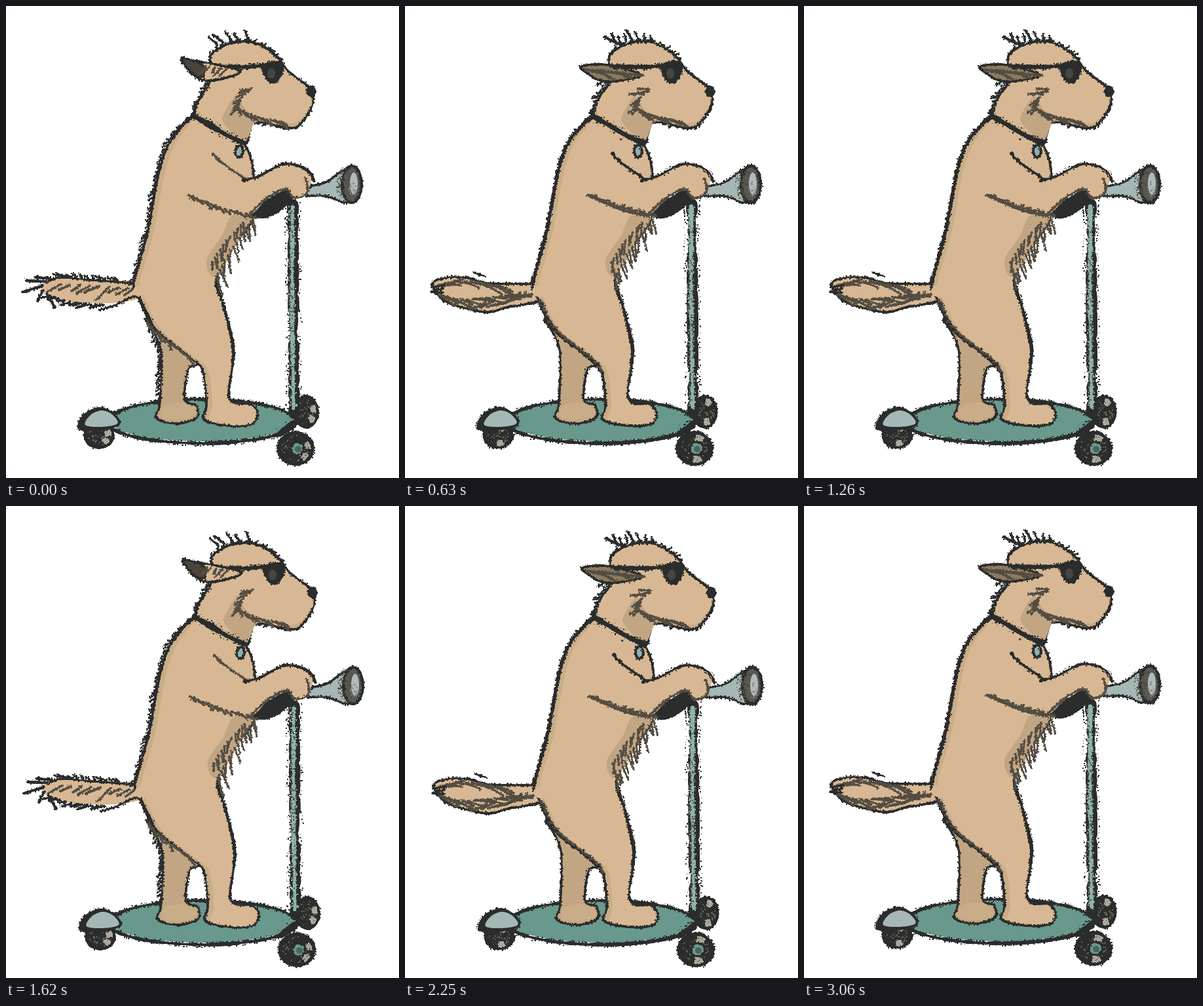
Write an HTML page with a canvas that moves like this. It is 600x720 px and loops after 3.15 s.

```html
<!DOCTYPE html>
<html lang="en">
<head>
<meta charset="utf-8">
<title>Dog on a scooter</title>
<style>
html, body { margin: 0; width: 100%; height: 100%; overflow: hidden; background: #fff; }
canvas { display: block; width: 600px; height: 720px; }
</style>
</head>
<body>
<canvas id="stage" width="600" height="720"></canvas>
<script>
const W = 600, H = 720, STEP = 90, FRAMES = 35;
const INK = '#2b2d2c', SOOT = '#544d42', TAN = '#d8b894', SHADE = '#c9ac88', DIM = '#c2a583',
      TEAL = '#69998c', MIST = '#8fb3aa', STEEL = '#a5b8b5';

function makeRandom(seed) {
  return () => {
    seed = (seed + 0x6D2B79F5) | 0;
    let t = Math.imul(seed ^ seed >>> 15, 1 | seed);
    t = t + Math.imul(t ^ t >>> 7, 61 | t) ^ t;
    return ((t ^ t >>> 14) >>> 0) / 4294967296;
  };
}

// Catmull-Rom through flat [x, y, ...] points, sampled about every 1.5 px
function curve(p, closed) {
  const n = p.length / 2, out = [];
  const at = i => {
    i = closed ? (i + n) % n : Math.max(0, Math.min(n - 1, i));
    return [p[2 * i], p[2 * i + 1]];
  };
  for (let i = 0; i < (closed ? n : n - 1); i++) {
    const [a, b, c, d] = [at(i - 1), at(i), at(i + 1), at(i + 2)];
    const k = Math.max(2, Math.ceil(Math.hypot(c[0] - b[0], c[1] - b[1]) / 1.5));
    for (let j = 0; j < k; j++) {
      const t = j / k;
      out.push([0, 1].map(m => 0.5 * (2 * b[m] + (c[m] - a[m]) * t
        + (2 * a[m] - 5 * b[m] + 4 * c[m] - d[m]) * t * t
        + (3 * b[m] - a[m] - 3 * c[m] + d[m]) * t * t * t)));
    }
  }
  out.push(closed ? out[0] : at(n - 1));
  return out;
}

// Points of an arc on an ellipse
function arc(x, y, rx, ry, from = 0, to = Math.PI * 11 / 6) {
  const p = [];
  for (let k = 0; k < 12; k++) {
    const a = from + (to - from) * k / 11;
    p.push(x + Math.cos(a) * rx, y + Math.sin(a) * ry);
  }
  return p;
}

function sketch(smooth) {
  const canvas = document.createElement('canvas');
  canvas.width = W; canvas.height = H;
  const g = canvas.getContext('2d');
  const rnd = makeRandom(smooth ? 77 : 31);
  const spread = s => (rnd() - 0.5) * 2 * s;
  const pick = (shaggy, sleek) => smooth ? sleek : shaggy;
  const dot = (x, y) => {
    const s = rnd() < 0.5 ? 1 : 2;
    g.fillRect(Math.round(x - 1), Math.round(y - 1), s, s);
  };
  g.lineCap = g.lineJoin = 'round';

  // Charcoal line: uneven core with crumbs along both sides
  function chalk(p, w = 5, color = INK, closed = false) {
    let press = 0.9, last = null;
    g.strokeStyle = g.fillStyle = color;
    for (const q of curve(p, closed)) {
      press = Math.max(0.6, Math.min(1.1, press + spread(0.2)));
      g.lineWidth = w * press * 0.75;
      g.beginPath();
      g.moveTo(...(last || q));
      g.lineTo(...q);
      g.stroke();
      for (let k = 0; k < 2; k++) dot(q[0] + spread(w * 0.6), q[1] + spread(w * 0.6));
      last = q;
    }
  }

  // Short hairs along a curve, leaning by an angle from its direction
  function fur(p, len, lean, gap = 6, w = 3, color = SOOT, closed = false) {
    const pts = curve(p, closed), hop = Math.max(1, Math.round(gap / 1.5));
    for (let i = 0; i < pts.length - 1; i += hop) {
      const [x, y] = pts[i], q = pts[i + 1];
      const a = Math.atan2(q[1] - y, q[0] - x) + lean + spread(0.25), l = len * (0.6 + rnd() * 0.6);
      chalk([x, y, x + Math.cos(a) * l, y + Math.sin(a) * l], w, color);
    }
  }

  // Filled outline; the fill may be shifted to leave a shaded edge
  function shape(p, color, w = 0, shift = null, shade = SHADE) {
    const path = new Path2D();
    curve(p, true).forEach(q => path.lineTo(...q));
    g.fillStyle = shift ? shade : color;
    g.fill(path);
    if (shift) {
      g.save();
      g.clip(path);
      g.translate(...shift);
      g.fillStyle = color;
      g.fill(path);
      g.restore();
    }
    if (w) chalk(p, w, INK, true);
  }
  const oval = (x, y, rx, ry, color, w = 0) => shape(arc(x, y, rx, ry), color, w);

  function specks(x, y, rx, ry, n, color) {
    g.fillStyle = color;
    while (n--) {
      const a = rnd() * 7, r = Math.sqrt(rnd());
      dot(x + Math.cos(a) * rx * r, y + Math.sin(a) * ry * r);
    }
  }

  function wheel(x, y, rx, ry) {
    oval(x, y, rx, ry, INK, 4);
    specks(x, y, rx * 0.8, ry * 0.8, 70, '#60655f');
    for (let r = 0.5; r < 0.9; r += 0.15) {
      for (const a of [pick(-0.5, -1.4), pick(0.5, 1.1)])
        chalk(arc(x, y, rx * r, ry * r, a, a + 0.5), 2, '#aba89b');
    }
  }

  function scooter() {
    wheel(458, 619, 18, 24);
    oval(299, 633, 141, 31, TEAL);
    chalk(arc(299, 634, 143, 34, 3.5, 6), 6);
    chalk(arc(299, 633, 146, 34, 0.25, 2.8), 7);

    wheel(142, 655, 22, 19);
    shape([112, 644, 118, 625, 142, 613, 164, 622, 172, 638, 142, 646], INK, 4);
    shape([121, 639, 129, 624, 146, 617, 162, 623, 170, 637, 145, 642], STEEL);

    chalk([438, 302, 440, 622], 21);
    chalk([437, 306, 437, 460, 439, 612], 8, MIST);
    specks(436, 460, 5, 150, 170, SOOT);
    chalk([418, 653, 433, 641, 448, 632], 12);

    wheel(442, 675, 27, 25);
    oval(445, 675, 10, 10, TEAL, 3);
    oval(446, 676, 5, 5, '#4b655d');
  }

  function horn() {
    shape([376, 314, 400, 296, 428, 282, 437, 292, 415, 314, 390, 323], INK, 3);
    shape([458, 277, 488, 269, 521, 250, 523, 298, 488, 290, 458, 289], STEEL, 4);
    oval(528, 272, 15, 28, '#565a53', 5);
    specks(518, 273, 14, 24, 150, SOOT);
    oval(531, 271, 6, 17, '#b1bbba');
    specks(530, 280, 6, 12, 30, '#8b8880');
  }

  function tail() {
    if (smooth) {
      const top = [42, 424, 60, 415, 90, 414, 130, 423, 204, 426];
      const under = [207, 448, 155, 460, 125, 467, 85, 459, 55, 446];
      shape([...top, ...under], TAN, 4);
      fur([48, 428, 90, 420, 145, 428], 30, 0.15, 9, 4);
      fur([52, 440, 90, 448, 165, 440], 28, 0.3, 9, 4);
      fur([100, 462, 145, 455, 180, 443], 24, -0.15, 9, 4);
      fur([105, 407, 118, 412], 14, 0, 8, 3, INK);
      fur([60, 426, 55, 442], 18, 1.2, 6, 4, INK);
    } else {
      shape([206, 422, 130, 418, 85, 414, 58, 421, 54, 434, 75, 448, 115, 452, 165, 453, 207, 444], TAN);
      chalk([204, 423, 130, 418, 85, 414, 64, 420], 4);
      chalk([207, 441, 190, 445, 165, 457, 142, 464], 4);
      fur([170, 418, 80, 412], 9, 0.5, 8, 3, INK);
      fur([195, 431, 130, 427, 75, 424], 24, -0.6, 14, 4);
      fur([150, 456, 100, 452, 66, 442], 14, -0.35, 8, 4, INK);
      fur([68, 416, 57, 424, 56, 436, 66, 440], 27, 0.85, 9, 5, INK);
    }
  }

  function legs() {
    const far = [216, 478, 230, 506, 237, 535, 235, 605, 230, 629, 262, 637, 291, 628, 290, 609, 273, 600,
                 278, 555, 290, 540];
    shape(far, DIM, 4);
    shape([242, 610, 268, 605, 288, 614, 286, 627, 255, 632, 236, 626], SHADE);
    if (!smooth) fur([220, 485, 236, 530, 234, 575, 235, 602], 8, 0.7, 6, 3, INK);
  }

  function body() {
    const trunk = [286, 170, 266, 187, 249, 210, 238, 237, 230, 270, 218, 337, 209, 372, 195, 423, 203, 446, 229, 494,
                   282, 537, 300, 556, 306, 608, 301, 629, 318, 637, 352, 641, 377, 637, 384, 622, 374, 608,
                   341, 599, 347, 530, 333, 460, 321, 420, 342, 374, 377, 322, 378, 256, 364, 211, 330, 190];
    shape(trunk, TAN, 4, [9, 1]);
    shape([306, 388, 330, 350, 345, 320, 376, 320, 358, 354, 320, 412], DIM);
    oval(206, 435, 12, 9, TAN);

    const back = trunk.slice(0, 16), thigh = [205, 450, 229, 494, 282, 537, 298, 555];
    if (smooth) {
      chalk(back, 5);
      fur(back, 5, 0.5, 8, 3, INK);
      chalk(thigh, 7);
      fur(thigh, 7, -0.5, 9, 3);
    } else {
      fur(back, 9, 0.6, 6, 3, INK);
      fur([216, 480, 229, 496, 282, 537], 13, 0.4, 8, 4);
      chalk([203, 446, 222, 482], 5);
    }
    chalk([346, 545, 347, 515, 333, 460, 322, 424], pick(4, 6));
    fur([377, 324, 342, 374, 320, 414], 24, -0.75, 8, 3);
    fur([362, 330, 335, 360, 314, 392], 20, -0.6, 8, 3);
  }

  function arm() {
    shape([325, 265, 360, 265, 385, 261, 422, 242, 450, 245, 467, 259, 461, 280, 450, 291, 438, 292,
           427, 279, 400, 292, 372, 318, 330, 308, 300, 290], TAN);
    chalk([316, 225, 330, 239, 363, 262], pick(4, 6), pick(SOOT, INK));
    chalk([361, 266, 385, 260, 421, 242, 447, 244, 464, 254, 470, 267], 5);
    chalk([372, 317, 400, 292, 427, 279, 438, 292, 454, 290, 461, 279, 457, 263], 4, SOOT);
    fur([279, 288, 302, 298, 330, 308, 372, 319], 12, pick(0.35, -0.3), 8, 4);
    if (smooth) chalk([283, 290, 303, 299, 335, 312, 372, 320], 5, SOOT);
  }

  function head() {
    const skull = [312, 78, 325, 65, 347, 56, 374, 55, 400, 66, 417, 81], chin = [466, 156, 450, 179, 432, 186, 382, 177];
    const nape = [311, 117, 298, 137, 288, 166];
    shape([...skull, 432, 100, 464, 125, 469, 138, ...chin, 372, 190, 364, 210, 325, 190, ...nape.reverse && [288, 166, 298, 137, 311, 117]],
          TAN, 4, [0, -7]);
    shape([352, 138, 336, 158, 332, 178, 364, 205, 380, 178, 400, 174, 368, 160], DIM);
    fur(nape.slice(), 8, 0.7, 6, 3, INK);
    fur(skull, 7, -0.7, 8, 3, INK);
    fur([322, 58, 348, 53, 380, 56], pick(17, 16), pick(-2.2, -1.9), pick(12, 9), 4, INK);
    if (smooth) chalk([305, 47, 316, 53, 334, 59], 5);
    fur(chin, 5, -0.4, 9, 3, INK);
    oval(466, 130, 6, 7, INK, 3);

    fur([374, 127, 360, 140, 355, 156], pick(16, 20), 0.5, 6, 4);
    fur([354, 156, 380, 168, 425, 178], pick(14, 18), pick(0.4, 0.15), 6, 4);

    if (smooth) {
      shape([268, 93, 292, 89, 321, 92, 360, 106, 320, 115, 296, 113, 279, 103], '#8c7a60', 4);
      fur([275, 97, 310, 101, 340, 104], 26, 0.15, 7, 4);
      fur([302, 115, 296, 140], 13, 0.9, 22, 4, INK);
    } else {
      shape([268, 81, 290, 84, 325, 90, 358, 100, 334, 110, 307, 114, 287, 106], TAN, 4);
      shape([268, 81, 290, 85, 303, 93, 300, 108, 286, 104], '#4a443b', 3);
      fur([305, 92, 340, 97], 15, 2.2, 8, 4);
    }

    chalk([pick(341, 318), 92, 365, 93, 400, 90, 420, 86], 8);
    shape([392, 91, 420, 86, 421, 102, 411, 116, 400, 113], INK, 4);
    oval(405, 103, 6, 8, '#454641');

    chalk([287, 168, 312, 182, 337, 197, 364, 209], 12);
    chalk([359, 208, 359, 216], 6);
    oval(356, 222, 6, 9, '#8eb1ad', 4);
  }

  [scooter, tail, legs, body, horn, arm, head].forEach(part => part());
  return canvas;
}

const ctx = document.getElementById('stage').getContext('2d');
const poses = [sketch(false), sketch(true)];
const start = performance.now();

function render() {
  const n = Math.floor((performance.now() - start) / STEP) % FRAMES;
  // Hand-held wobble that repeats every seven steps
  const r = n % 7;
  const dx = (5 * r ** 3 + 4 * r ** 2 + 6 * r) % 7;
  const dy = Math.round(1.3 - 1.3 * Math.cos(r / 7 * 2 * Math.PI));
  ctx.fillStyle = '#fff';
  ctx.fillRect(0, 0, W, H);
  ctx.drawImage(poses[n % 3 ? 1 : 0], dx, dy);
  requestAnimationFrame(render);
}
render();
</script>
</body>
</html>
```
